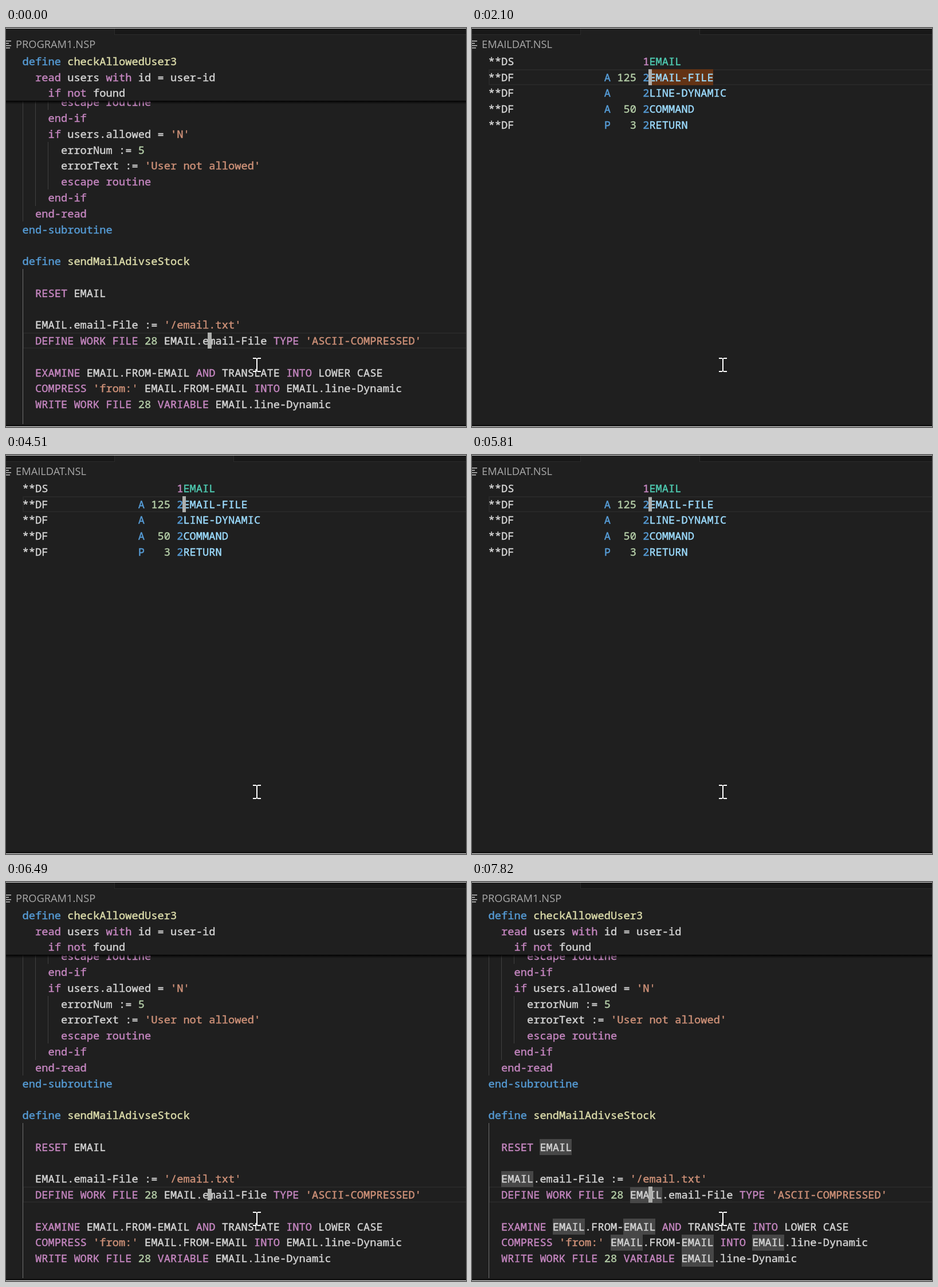
An HTML page with a canvas that plays this animation: 803 px wide and 697 px high, repeating every 8000 ms.

```html
<!DOCTYPE html>
<html lang="en">
<head>
<meta charset="utf-8">
<title>Code editor: go to definition</title>
<style>
  html, body { margin: 0; width: 100%; height: 100%; overflow: hidden; background: #1f1f1f; }
  canvas { display: block; }
</style>
</head>
<body>
<canvas id="stage" width="803" height="697"></canvas>
<script>
const ctx = document.getElementById('stage').getContext('2d');
const W = 803, H = 697, LOOP = 8000;
const LEFT = 28.5, CELL = 11.235, ROW = 27.77;
const HEADER = 44, PROGRAM_TOP = 32.7, FOOT = 692;
const CODE_FONT = '18.7px "Noto Sans Mono", monospace';
const TITLE_FONT = '18.25px "Open Sans", sans-serif';

const C = {
  bg: '#1f1f1f', bar: '#181818', border: '#2b2b2b', lineBorder: '#282828',
  text: '#d4d4d4', keyword: '#c586c0', blue: '#569cd6', func: '#dcdcaa',
  string: '#ce9178', number: '#b5cea8', field: '#9cdcfe', type: '#4ec9b0',
  guide: '#404040', activeGuide: '#707070', caret: '#aeafad',
  found: '#633315', word: '#474747', title: '#a9a9a9'
};

const PROGRAM = [
  '    if not found',
  '      errorNum := 4',
  "      errorText := 'User not found'",
  '      escape routine',
  '    end-if',
  "    if users.allowed = 'N'",
  '      errorNum := 5',
  "      errorText := 'User not allowed'",
  '      escape routine',
  '    end-if',
  '  end-read',
  'end-subroutine',
  '',
  'define sendMailAdivseStock',
  '',
  '  RESET EMAIL',
  '',
  "  EMAIL.email-File := '/email.txt'",
  "  DEFINE WORK FILE 28 EMAIL.email-File TYPE 'ASCII-COMPRESSED'",
  '',
  '  EXAMINE EMAIL.FROM-EMAIL AND TRANSLATE INTO LOWER CASE',
  "  COMPRESS 'from:' EMAIL.FROM-EMAIL INTO EMAIL.line-Dynamic",
  '  WRITE WORK FILE 28 VARIABLE EMAIL.line-Dynamic'
];
const STICKY = ['define checkAllowedUser3', '  read users with id = user-id', PROGRAM[0]];
const CURRENT = 18;

// format, length, level, name
const FIELDS = [
  ['', '', '1', 'EMAIL'],
  ['A', '125', '2', 'EMAIL-FILE'],
  ['A', '', '2', 'LINE-DYNAMIC'],
  ['A', '50', '2', 'COMMAND'],
  ['P', '3', '2', 'RETURN']
];

// column, first row, last row, colour
const GUIDES = [
  [0, 0, 10, C.guide], [2, 0, 9, C.guide],
  [4, 1, 3, C.guide], [4, 6, 8, C.guide],
  [0, 14, 23, C.activeGuide]
];

const KEYWORDS = new Set(('if not read with escape routine end-if end-read RESET DEFINE WORK FILE ' +
  'TYPE EXAMINE AND INTO COMPRESS WRITE VARIABLE').split(' '));

const OPEN_FIELDS = 2100, FOUND_OFF = 2430, BACK = 5950, STICKY_ON = 6220, WORDS_ON = 7820;

// start, end, steps, grows; a single step shows the caret at once
const BLINKS = [
  [130, 410, 5, false], [610, 890, 5, true],
  [1150, 1430, 5, false], [1620, 1900, 5, true],
  [OPEN_FIELDS, OPEN_FIELDS, 1, true],
  [2700, 2970, 5, false], [3190, 3490, 5, true],
  [3760, 4030, 5, false], [4230, 4510, 5, true],
  [4780, 5060, 5, false], [5260, 5540, 5, true],
  [5810, 6090, 5, false],
  [BACK, BACK, 1, true],
  [6420, 6750, 6, false], [7020, 7290, 5, true],
  [7220, 7220, 1, true]
];

// time, left edge of the caret in the program
const CARET_MOVES = [[0, 352], [7220, 342], [7290, 331], [7490, 320], [7560, 308]];

const colX = col => LEFT + col * CELL;

function rect(x, y, w, h, color) {
  ctx.fillStyle = color;
  ctx.fillRect(x, y, w, h);
}

// A thin outline gives the letters their sturdier weight.
function put(text, col, top, color) {
  ctx.fillStyle = ctx.strokeStyle = color;
  ctx.lineWidth = 0.45;
  ctx.lineJoin = 'round';
  const base = Math.round(top + 20.4);
  [...text].forEach((ch, i) => {
    if (ch === ' ') return;
    ctx.fillText(ch, colX(col + i), base);
    ctx.strokeText(ch, colX(col + i), base);
  });
}

function colorOf(token) {
  if (token[0] === "'") return C.string;
  if (/^\d+$/.test(token)) return C.number;
  if (/^(define|end-subroutine)$/.test(token)) return C.blue;
  if (/^(checkAllowedUser3|sendMailAdivseStock)$/.test(token)) return C.func;
  return KEYWORDS.has(token) ? C.keyword : C.text;
}

function codeLine(line, top) {
  for (const m of line.matchAll(/'[^']*'|[\w.-]+|[:=]+/g)) put(m[0], m.index, top, colorOf(m[0]));
}

function currentLine(top) {
  ctx.strokeStyle = C.lineBorder;
  ctx.lineWidth = 2;
  ctx.strokeRect(30, Math.round(top) + 1, W, 26);
}

function shadow(y) {
  const g = ctx.createLinearGradient(0, y, 0, y + 6);
  g.addColorStop(0, 'rgba(0,0,0,.95)');
  g.addColorStop(0.35, 'rgba(0,0,0,.6)');
  g.addColorStop(1, 'rgba(0,0,0,0)');
  rect(0, y, W, 6, g);
}

function caretScale(t) {
  let scale = 1;
  for (const [start, end, steps, grows] of BLINKS) {
    if (t < start) break;
    if (steps === 1) { scale = 1; continue; }
    const step = Math.min(steps - 1, Math.floor((t - start) / (end - start) * (steps - 1) + 1e-6));
    const u = Math.min(1, (step + 0.86) / (steps - 0.7));
    const eased = u * u * (3 - 2 * u);
    scale = grows ? eased : 1 - eased;
  }
  return scale;
}

function caret(x, top, t, width) {
  const h = 28 * caretScale(t);
  rect(x, Math.floor(top) + 14 - h / 2, width, h, C.caret);
}

function header(title, tabFrom, tabTo) {
  rect(0, 0, W, HEADER - 1, C.bg);
  rect(0, 0, W, 11, C.bar);
  rect(0, 11, W, 1, C.border);
  rect(tabFrom, 1, tabTo - tabFrom, 11, C.bg);
  for (const x of [tabFrom, tabTo]) if (x > 0) rect(x, 1, 1, 11, C.border);
  [9, 5, 9, 7].forEach((w, i) => rect(0, 22 + i * 4, w, 1.5, '#c5c5c5'));
  ctx.font = TITLE_FONT;
  ctx.fillStyle = C.title;
  ctx.fillText(title, 17, 35);
  ctx.font = CODE_FONT;
}

function programView(t) {
  const rowTop = k => PROGRAM_TOP + k * ROW;
  currentLine(rowTop(CURRENT) - 0.6);
  for (const [col, from, to, color] of GUIDES) {
    rect(Math.round(colX(col)), Math.round(rowTop(from)), 1, Math.round((to - from + 1) * ROW), color);
  }
  PROGRAM.forEach((line, k) => {
    if (t >= WORDS_ON) {
      for (const m of line.matchAll(/\bEMAIL\b/g)) {
        rect(Math.round(colX(m.index)), Math.round(rowTop(k)), 56, 28, C.word);
      }
    }
    codeLine(line, rowTop(k));
  });
  const x = CARET_MOVES.filter(m => t >= m[0]).pop()[1];
  caret(x, rowTop(CURRENT), t, 7);

  if (t < OPEN_FIELDS || t >= STICKY_ON) {
    rect(0, HEADER - 1, W, 84, C.bg);
    STICKY.forEach((line, i) => codeLine(line, HEADER + 0.5 + i * ROW));
    shadow(127);
    header('PROGRAM1.NSP', 0, 189);
  } else {
    header('PROGRAM1.NSP', 0, 189);
    shadow(HEADER - 1);
  }
}

function fieldsView(t) {
  const rowTop = i => HEADER + 0.5 + i * ROW;
  currentLine(rowTop(1) - 0.3);
  if (t < FOUND_OFF) rect(309, 72, 112, 28, C.found);
  FIELDS.forEach(([format, length, level, name], i) => {
    const top = rowTop(i), root = i === 0;
    put(root ? '**DS' : '**DF', 0, top, C.text);
    put(format, 18, top, C.blue);
    put(length, 23 - length.length, top, C.number);
    put(level, 24, top, root ? C.keyword : C.blue);
    put(name, 25, top, root ? C.type : C.field);
  });
  caret(308, rowTop(1), t, 6);
  header('EMAILDAT.NSL', 189, 397);
}

function pointer() {
  rect(437, 577, 2, 23, '#fff');
  for (const y of [576, 599]) {
    rect(431, y, 6, 2, '#fff');
    rect(439, y, 6, 2, '#fff');
  }
}

function draw(t) {
  rect(0, 0, W, H, C.bg);
  ctx.font = CODE_FONT;
  if (t >= OPEN_FIELDS && t < BACK) fieldsView(t);
  else programView(t);
  rect(0, FOOT, W, 4, C.bar);
  rect(0, 0, W, 1, '#d8d8d8');
  rect(0, H - 1, W, 1, '#f0f0f0');
  pointer();
}

const began = performance.now();
function tick() {
  draw((performance.now() - began) % LOOP);
  requestAnimationFrame(tick);
}
tick();
</script>
</body>
</html>
```
